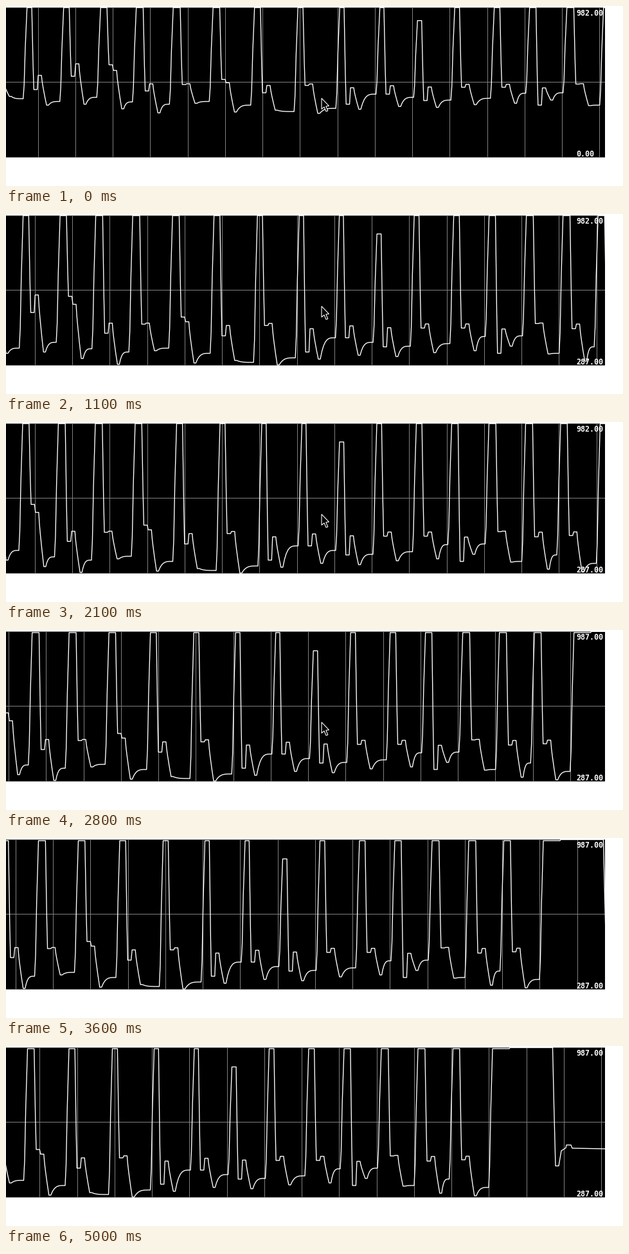
A matplotlib script that plays this animation: 960 px wide and 280 px high, repeating every 5.1 s.

```python
import numpy as np
import matplotlib.pyplot as plt
from matplotlib.animation import FuncAnimation
from matplotlib.patches import Polygon

W, H, DPI = 960, 280, 100
PLOT_W, TOP, BOTTOM = 932, 2, 236
SPAN = BOTTOM - TOP - 1
FRAMES, INTERVAL = 51, 100
PX = 72 / DPI
GRID_GREY = "#7f7f7f"
GRID_STEP = 58.25
LOW, PEAK, HIGH = 287, 982, 987
EASE = 0.57
HIGH_ENTERS = 24
SHORT_BEAT = 11
FINAL_RISE = 1046

# Each beat: start x, then the heights of its shelf, dip and rest.
BEATS = [
    (-24, 190, 198, 203), (33, 183, 217, 209), (90, 154, 215, 200),
    (147.5, 129, 225, 210), (203, 186, 234, 215), (260.5, 172, 213, 209),
    (322.5, 161, 232, 217), (387, 190, 228, 231), (454.5, 174, 235, 224),
    (519.5, 215, 226, 193), (582, 193, 220, 200), (640.5, 207, 222, 206),
    (698.5, 178, 216, 202), (760, 178, 213, 191), (815, 217, 206, 190),
    (873, 171, 218, 217), (930, 179, 229, 207), (984.5, 177, 233, 220),
]


def beat(k, start, shelf, dip, rest, following):
    """Points of one beat, from its plateau up to the next rise."""
    top = 32.5 if k == SHORT_BEAT else 4.2
    next_top = 32.5 if k + 1 == SHORT_BEAT else 4.2
    end = start + 8.6 - 2.3 * np.cos(2 * np.pi * (k - 10.2) / 11)
    bump = 172 + 0.2 * (shelf - 180) - 40 * np.exp(-(k - 2) ** 2 / 1.5)

    points = [(start, top), (end, top), (end + 2, top + 0.7 * (shelf - top)),
              (end + 3.2, shelf), (end + 8.5, shelf),
              (end + 10, bump), (end + 15, bump)]
    for u in np.linspace(0.15, 1, 6):
        points.append((end + 15 + 8 * u, bump + (dip - bump) * u ** 0.8))

    settle, leave = end + 26, following - 6
    for u in np.linspace(0, 1, 10):
        points.append((settle + (leave - settle) * u,
                       rest + (dip - rest) * (1 - u) ** 4))
    for before, part in ((4.5, 0.15), (2.8, 0.55)):
        points.append((following - before, rest + (next_top - rest) * part))
    return points


def build_signal():
    starts = [b[0] for b in BEATS[1:]] + [FINAL_RISE]
    points = []
    for k, (row, following) in enumerate(zip(BEATS, starts)):
        points += beat(k, *row, following)
    # Long saturated plateau, then a steady level.
    points += [(FINAL_RISE, 4.2), (1072, 4.2), (1073, 2.5), (1139.5, 2.5),
               (1141.5, 90), (1144, 186.5), (1149, 186.5), (1153, 163),
               (1160, 158.5), (1161, 154), (1168, 154), (1170, 159),
               (1225, 160)]
    x, y = np.array(points).T
    return x, HIGH - (y - TOP - 0.5) * (HIGH - LOW) / SPAN


def scroll(i):
    return np.interp(i, [0, 6, 15, 28, 36, 43, 50],
                     [0, 34, 86.3, 162, 209.7, 249, 288.7])


def value_range(i):
    """Range eases towards the current minimum and maximum."""
    lo = LOW * (1 - EASE ** i)
    hi = PEAK + (HIGH - PEAK) * (1 - EASE ** max(0, i - HIGH_ENTERS))
    return lo, hi


fig = plt.figure(figsize=(W / DPI, H / DPI), dpi=DPI, facecolor="white")
ax = fig.add_axes([0, 1 - BOTTOM / H, PLOT_W / W, (BOTTOM - TOP) / H])
ax.set(xlim=(0, PLOT_W), ylim=(BOTTOM, TOP), facecolor="black",
       xticks=[], yticks=[])
for spine in ax.spines.values():
    spine.set_visible(False)

for y in (TOP + 0.5, 118.5, BOTTOM - 0.5):
    ax.plot([0, PLOT_W], [y, y], color=GRID_GREY, lw=PX)
bars = [ax.plot([], [], color=GRID_GREY, lw=PX)[0] for _ in range(17)]
curve, = ax.plot([], [], color="white", lw=1.35 * PX, zorder=3)


def label(baseline):
    return ax.text(887.5, baseline, "", color="white", fontsize=11.65 * PX,
                   family="DejaVu Sans Mono", weight="bold",
                   va="baseline", zorder=4)


top_label, low_label = label(14.8), label(234.5)

ARROW = np.array([(491, 143.5), (491, 160.5), (495, 157), (498, 164),
                  (500.8, 163), (497.8, 156), (502.5, 155.5)])
cursor = Polygon(ARROW, closed=True, fc="black", ec="white",
                 lw=1.1 * PX, zorder=5, clip_on=False)
ax.add_patch(cursor)

xs, values = build_signal()


def draw(i):
    shift = scroll(i) + 0.3
    first = (50 - shift) % GRID_STEP
    for k, bar in enumerate(bars):
        x = first + k * GRID_STEP
        bar.set_data([x, x], [TOP, BOTTOM])

    lo, hi = value_range(i)
    curve.set_data(xs - shift, TOP + 0.5 + (hi - values) / (hi - lo) * SPAN)
    top_label.set_text(f"{HIGH if i > HIGH_ENTERS else PEAK:.2f}")
    low_label.set_text(f"{LOW if i else 0:.2f}")

    # The pointer leaves through the bottom edge.
    leave = np.clip((i - 30) / 5, 0, 1)
    cursor.set_xy(ARROW + [0, 145 * leave ** 2])
    return [*bars, curve, top_label, low_label, cursor]


anim = FuncAnimation(fig, draw, frames=FRAMES, interval=INTERVAL,
                     repeat=True, repeat_delay=0)
plt.show()
```
